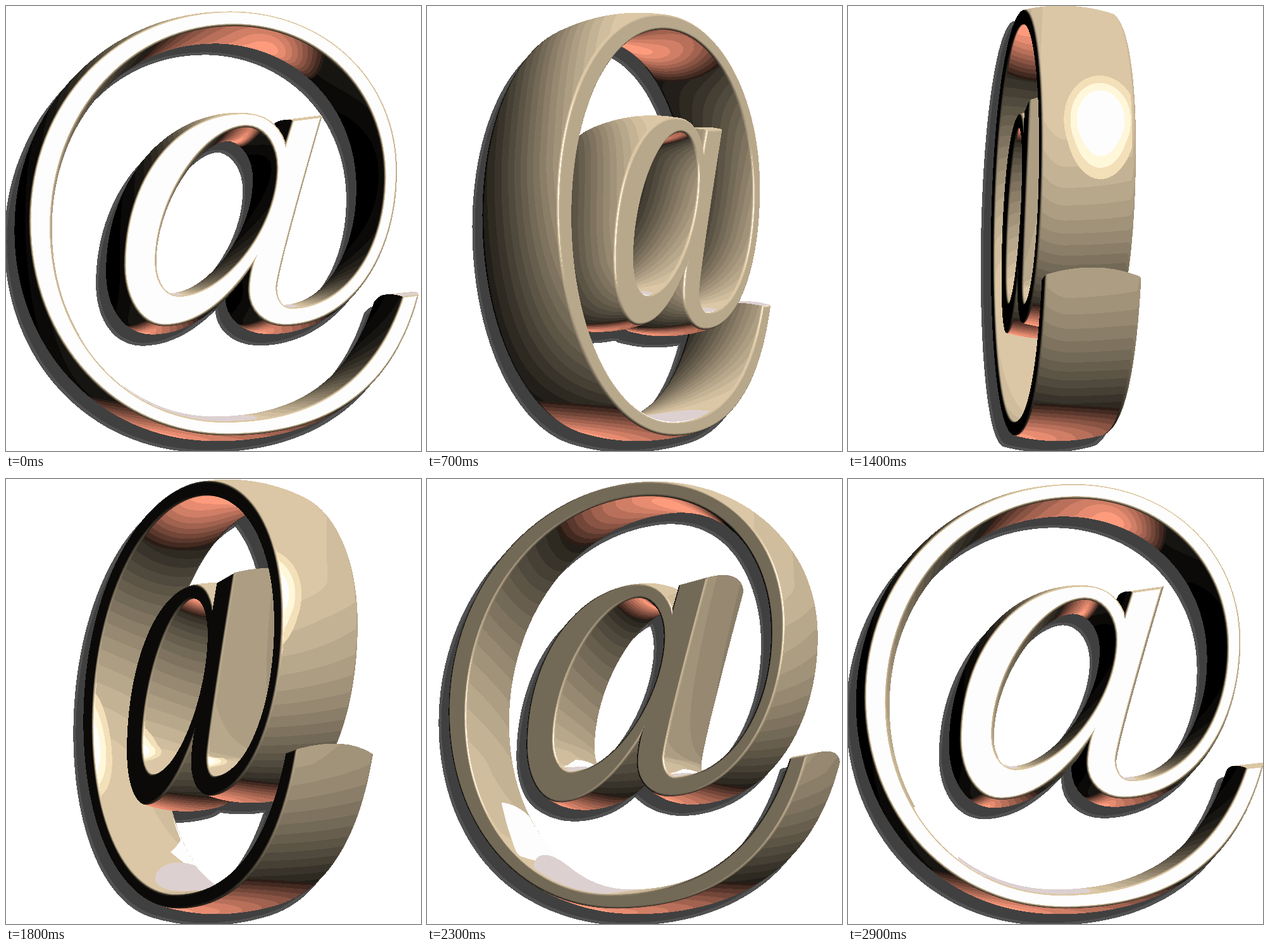
Write an HTML page with a canvas that moves like this. It is 656 px wide and 704 px high and loops after 3000 ms.

```html
<!DOCTYPE html>
<html lang="en">
<head>
<meta charset="utf-8">
<title>Turning at sign</title>
<style>
html, body { margin: 0; width: 100%; height: 100%; overflow: hidden; background: #fff; }
canvas { display: block; }
</style>
</head>
<body>
<canvas id="stage" width="656" height="704"></canvas>
<script>
const W = 656, H = 704, RAD = Math.PI / 180;
const CX = 330, CY = 345, DIST = 3000, FRONT = 68, BACK = -72;
const TILT = Math.asin(0.12), CT = Math.cos(TILT), ST = Math.sin(TILT);
const START = 15, STEP = 6;

const ctx = document.getElementById('stage').getContext('2d');
const img = ctx.createImageData(W, H);
const pix = new Uint32Array(img.data.buffer);
const depth = new Float32Array(W * H);

// Outline at the starting angle. Each entry is an end point, reached by a line,
// by a curve bent towards a given corner [x, y, cx, cy], or by a quarter arc
// that sets off horizontally ('h') or vertically ('v'), with optional roundness.
const OUTER = [[648, 460], [350, 675, 590, 675],
  [40, 340, 'h'], [355, 11, 'v'], [615, 260, 'h'], [440, 502, 'v'],
  [386, 450, 'h'], [397, 392, 386, 425], [250, 502, 325, 502],
  [190, 410, 'h'], [375, 172, 'v'], [442, 225, 428, 172],
  [455, 183], [495, 178], [425, 445, 428, 410], [450, 480, 'v'],
  [601, 270, 'h'], [360, 27, 'v'], [68, 350, 'h'], [345, 660, 'v'],
  [629, 462, 565, 660], [648, 460]];
const COUNTER = [[234, 405], [272, 461, 'v'], [431, 255, 'h', 0.47], [380, 187, 'v'], [234, 405, 'h', 0.47]];

const clamp = (v, lo, hi) => Math.max(lo, Math.min(hi, v));
const mix = (a, b, k) => [a[0] + (b[0] - a[0]) * k, a[1] + (b[1] - a[1]) * k];

let cos = 1, sin = 0;
function turn(deg) { cos = Math.cos(deg * RAD); sin = Math.sin(deg * RAD); }

function rotate(x, y, z) {
  const zr = z * cos - x * sin;
  return [x * cos + z * sin, y * CT - zr * ST, zr * CT + y * ST];
}
function project(x, y, z) {
  const r = rotate(x, y, z), w = 1 / (DIST - r[2]);
  return [CX + r[0] * DIST * w, CY + r[1] * DIST * w, w];
}
// Stage point back to the front plane of the solid.
function toPlane([X, Y]) {
  let p = 1, x = 0, y = 0;
  for (let i = 0; i < 12; i++) {
    x = ((X - CX) / p - FRONT * sin) / cos;
    const zr = FRONT * cos - x * sin;
    y = ((Y - CY) / p + zr * ST) / CT;
    p = DIST / (DIST - zr * CT - y * ST);
  }
  return [x, y];
}

// Four control points for one outline entry.
function segment(a, [x, y, bend, more]) {
  const d = [x, y];
  if (bend === undefined) return [a, mix(a, d, 1 / 3), mix(a, d, 2 / 3), d];
  const arc = typeof bend === 'string';
  const corner = !arc ? [bend, more] : bend === 'h' ? [x, a[1]] : [a[0], y];
  const k = arc ? more || 0.57 : 2 / 3;
  return [a, mix(a, corner, k), mix(d, corner, k), d];
}

// Curves of points {x, y, n: shading normal, m: offset direction}.
function buildContour(list) {
  const curves = list.slice(1).map((entry, i) => {
    const [a, b, c, d] = segment(list[i], entry).map(toPlane);
    const count = clamp(Math.round(Math.hypot(d[0] - a[0], d[1] - a[1]) / 9), 6, 32);
    return Array.from({ length: count + 1 }, (_, j) => {
      const t = j / count, ab = mix(a, b, t), bc = mix(b, c, t), cd = mix(c, d, t);
      const p = mix(ab, bc, t), q = mix(bc, cd, t), [x, y] = mix(p, q, t);
      const tx = q[0] - p[0], ty = q[1] - p[1], len = Math.hypot(tx, ty);
      const n = [ty / len, -tx / len];
      return { x, y, n, m: n };
    });
  });
  curves.forEach((curve, i) => {
    const end = curve[curve.length - 1], next = curves[(i + 1) % curves.length][0];
    const k = Math.max(0.5, 1 + end.n[0] * next.n[0] + end.n[1] * next.n[1]);
    end.m = next.m = [(end.n[0] + next.n[0]) / k, (end.n[1] + next.n[1]) / k];
  });
  return curves;
}

// Cross-section of the wall: a gentle bulge between two rounded edges.
const BULGE = 8, LEAN = 14, EDGE = 4, BACK_EDGE = 7;
const profile = [];
function addPoint(deg, z, o) {
  profile.push({ z, o, r: Math.cos(deg * RAD), nz: Math.sin(deg * RAD) });
}
function addEdge(deg, z, radius) {
  addPoint(deg, z + radius * Math.sin(deg * RAD), EDGE + radius * (Math.cos(deg * RAD) - 1));
}
const wallTop = FRONT - EDGE, wallEnd = BACK + BACK_EDGE;
for (let deg = 90; deg > LEAN; deg -= 19) addEdge(deg, wallTop, EDGE);
for (let v = 1; v >= -1; v -= 0.25)
  addPoint(LEAN * v, (wallTop + wallEnd + (wallTop - wallEnd) * v) / 2, EDGE + BULGE * (1 - v * v));
for (let deg = -33; deg >= -90; deg -= 19) addEdge(deg, wallEnd, BACK_EDGE);

turn(START);
const contours = [OUTER, COUNTER].map(buildContour);

const rgb = (r, g, b) => (255 << 24 | b << 16 | g << 8 | r) >>> 0;
const WHITE = rgb(255, 255, 255), GLOW = rgb(253, 253, 253);
const CREAM = rgb(255, 247, 218), SAND = rgb(243, 223, 184), LILAC = rgb(221, 208, 208);
const SHADOW = rgb(64, 64, 64), RIM = rgb(82, 82, 82);
const BANDS = 18;
const tan = light => {
  const k = Math.round(light * BANDS) / BANDS;
  return rgb(208 * k, 189 * k, 157 * k);
};
const red = light => {
  const k = Math.round(light * 10) / 10;
  return rgb(20 + 235 * k, 14 + 141 * k, 11 + 114 * k);
};

// Colour from the view normal: nx right, ny up, nz to the viewer.
function shade(nx, ny, nz, low) {
  if (ny < -0.7) {
    const r = 1.2 - 1.1 * Math.hypot((nx + 0.4) / 1.2, (ny + 0.98) / 0.22);
    if (r > 0.08) return red(Math.min(1, r));
  }
  if (low && ny > 0.5) {
    if (ny + 0.3 * nx > 0.97) return LILAC;
    if (nx > 0.45 && nz < 0.42) return GLOW;
  }
  if (nz > 0.7) {
    const h = Math.hypot(nx - 0.22, (ny - 0.22) * 0.75);
    if (h < 0.13) return GLOW;
    if (h < 0.165) return CREAM;
    if (h < 0.2) return SAND;
  }
  const t = clamp((nx + 1) / 1.03, 0, 1), side = t * t * (3 - 2 * t) - 0.15 * Math.max(0, nx) ** 2;
  const drop = 1 - 0.7 * Math.max(0, 0.3 - ny) ** 1.6;
  return tan(1.08 * side * Math.max(0.1, drop));
}

function triangle(a, b, c) {
  const bx = b[0] - a[0], by = b[1] - a[1], cx = c[0] - a[0], cy = c[1] - a[1];
  const det = bx * cy - cx * by;
  if (Math.abs(det) < 1e-7) return;
  const x0 = Math.max(0, Math.ceil(Math.min(a[0], b[0], c[0])));
  const x1 = Math.min(W - 1, Math.floor(Math.max(a[0], b[0], c[0])));
  const y0 = Math.max(0, Math.ceil(Math.min(a[1], b[1], c[1])));
  const y1 = Math.min(H - 1, Math.floor(Math.max(a[1], b[1], c[1])));
  for (let y = y0; y <= y1; y++) for (let x = x0; x <= x1; x++) {
    const dx = x - a[0], dy = y - a[1];
    const u = (dx * cy - cx * dy) / det, v = (bx * dy - dx * by) / det, k = 1 - u - v;
    if (u < -1e-6 || v < -1e-6 || k < -1e-6) continue;
    const at = y * W + x, blend = i => k * a[i] + u * b[i] + v * c[i], w = blend(2);
    if (w <= depth[at]) continue;
    depth[at] = w;
    pix[at] = shade(blend(3), blend(4), blend(5), y > CY);
  }
}

function drawWalls() {
  for (const curve of contours.flat()) {
    let last = null;
    for (const p of curve) {
      const rib = profile.map(q => {
        const n = rotate(p.n[0] * q.r, p.n[1] * q.r, q.nz);
        return [...project(p.x + p.m[0] * q.o, p.y + p.m[1] * q.o, q.z), n[0], -n[1], n[2]];
      });
      if (last) for (let i = 1; i < rib.length; i++) {
        triangle(last[i - 1], rib[i - 1], rib[i]);
        triangle(last[i - 1], rib[i], last[i]);
      }
      last = rib;
    }
  }
}

function drawFace() {
  const o = project(0, 0, FRONT), a = project(100, 0, FRONT), b = project(0, 100, FRONT);
  const ax = a[0] - o[0], ay = a[1] - o[1], bx = b[0] - o[0], by = b[1] - o[1];
  const det = ax * by - bx * ay;
  if (det <= 0) return;
  const n = rotate(0, 0, 1), color = shade(n[0], -n[1], n[2], false);
  const wx = ((a[2] - o[2]) * by - (b[2] - o[2]) * ay) / det;
  const wy = ((b[2] - o[2]) * ax - (a[2] - o[2]) * bx) / det;
  const rows = Array.from({ length: H }, () => []);
  for (const contour of contours) {
    const pts = contour.flat().map(p => project(p.x, p.y, FRONT));
    pts.forEach((p, i) => {
      const q = pts[(i + 1) % pts.length];
      const [t, u] = p[1] < q[1] ? [p, q] : [q, p];
      for (let y = Math.max(0, Math.ceil(t[1])); y < Math.min(H, u[1]); y++)
        rows[y].push(t[0] + (u[0] - t[0]) * (y - t[1]) / (u[1] - t[1]));
    });
  }
  rows.forEach((xs, y) => {
    xs.sort((p, q) => p - q);
    for (let i = 0; i + 1 < xs.length; i += 2)
      for (let x = Math.max(0, Math.ceil(xs[i])); x <= Math.min(W - 1, xs[i + 1]); x++) {
        const w = o[2] + wx * (x - o[0]) + wy * (y - o[1]) + 1e-8, at = y * W + x;
        if (w > depth[at]) { depth[at] = w; pix[at] = color; }
      }
  });
}

function drawShadow() {
  const solid = (x, y) => x >= 0 && x < W && y >= 0 && y < H && depth[y * W + x] > 0;
  for (let y = 0; y < H; y++) for (let x = 0; x < W; x++) {
    if (depth[y * W + x] > 0) continue;
    const sx = x + 16, sy = y - 18;
    if (!solid(sx, sy)) continue;
    const core = [-4, 4].every(i => solid(sx + i, sy - 4) && solid(sx + i, sy + 4));
    pix[y * W + x] = core ? SHADOW : RIM;
  }
}

function render(step) {
  const deg = START + STEP * step;
  turn(deg > 90 ? deg - 180 : deg);
  pix.fill(WHITE);
  depth.fill(0);
  drawWalls();
  drawFace();
  drawShadow();
  ctx.putImageData(img, 0, 0);
}

let shown = -1;
function tick() {
  const step = Math.floor(performance.now() % 3000 / 100);
  if (step !== shown) render(shown = step);
  requestAnimationFrame(tick);
}
tick();
</script>
</body>
</html>
```
